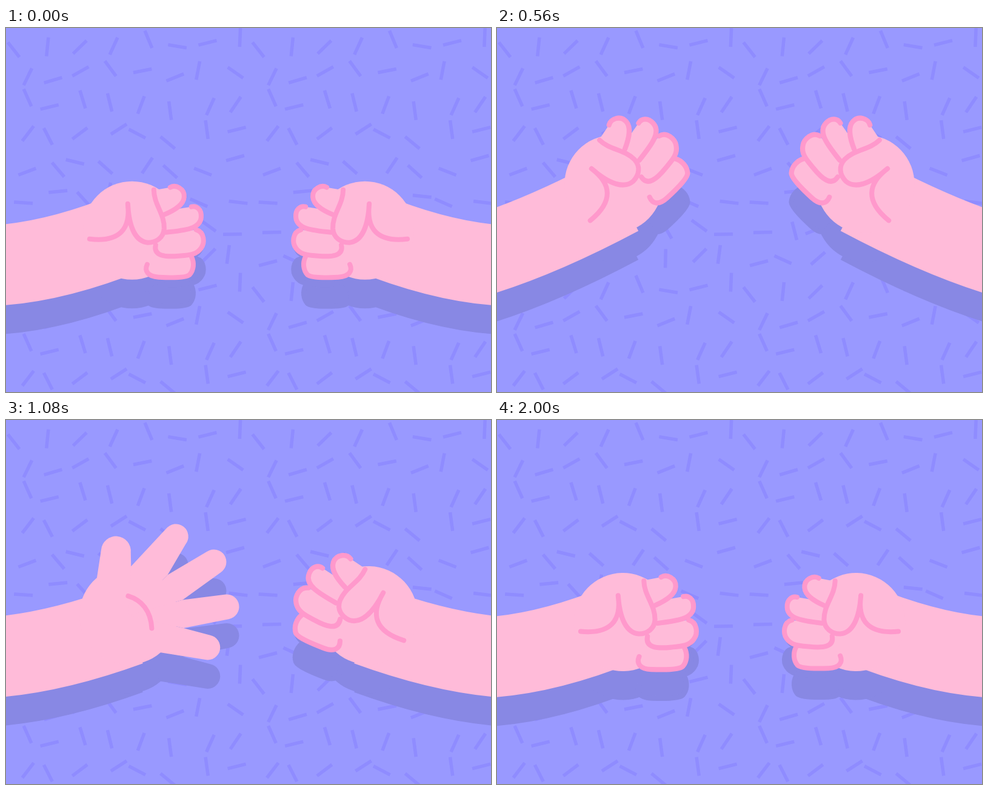
An HTML page with a canvas for the animation above (2040 ms loop, 800 by 600 pixels).

```html
<!DOCTYPE html>
<html>
<head>
<meta charset="utf-8">
<style>
html, body { margin: 0; width: 100%; height: 100%; overflow: hidden; background: #99f; }
canvas { display: block; }
</style>
</head>
<body>
<canvas width="800" height="600"></canvas>
<script>
const ctx = document.querySelector('canvas').getContext('2d');
const LOOP = 2040, STEP = 40, RAD = Math.PI / 180;
const SKIN = '#ffbbd9', LINE = '#ff99cc', SHADE = '#8888e4';

// Key poses: wrist x, wrist y, forearm angle, hand rotation, finger stretch
const REST = [160, 354, -22, 0, 0];
const UP = [160, 298, -28, -46, .03];
const DOWN = [165, 374, -16.5, -2, .04];
const HOLD = [161, 354, -20, -24, .03];

// Curled fingers: extra corner for the fill, then the outline
const CURLED = [
  ['248 268', '271 264C280 259 295 266 294 280C293 294 275 303 261 309'],
  ['280 300', '306 296C314 294 323 300 322 313C321 332 296 335 264 338'],
  ['264 338', '314 334C328 338 328 356 322 364C314 376 300 376 285 377C262 379 243 377 247 359'],
  ['250 370', '306 378C311 388 310 400 303 408C297 414 270 413 252 412C234 411 228 402 233 391']
].map(([corner, line]) => [new Path2D(`M${corner}L${line}`), new Path2D('M' + line)]);
const THUMB = new Path2D('M244 268C244 292 262 308 261 332C260 347 248 355 234 355' +
  'C214 353 203 330 201 291C206 332 188 355 138 349');
const CREASE = new Path2D('M0 -32C22 -25 37 -7 38 22');
const VALLEYS = [-129, -86, -45, -15, 14, 50];

const ramp = (t, from, to) => Math.min(1, Math.max(0, (t - from) / (to - from)));
const smooth = (t, from, to) => {
  const u = ramp(t, from, to);
  return u * u * (3 - 2 * u);
};
const mix = (a, b, k) => a.map((v, i) => v + (b[i] - v) * k);
const polar = (angle, r) => [r * Math.cos(angle * RAD), r * Math.sin(angle * RAD)];

// Lift slowly, throw with growing speed, bounce into the hold, return
function poseAt(t) {
  let pose = mix(REST, UP, smooth(t, 120, 560));
  pose = mix(pose, DOWN, ramp(t, 560, 870) ** 2.7);
  pose = mix(pose, HOLD, smooth(t, 860, 1080));
  return mix(pose, REST, smooth(t, 1740, LOOP));
}
const openAt = t => smooth(t, 760, 880) - smooth(t, 1740, LOOP);

// Repeating tile of dashes on a jittered grid
function scatter() {
  const tile = 403.5, n = 8, cell = tile / n, path = new Path2D();
  let seed = 7;
  const random = () => (seed = seed * 16807 % 2147483647) / 2147483647;
  for (let i = 0; i < n * n; i++) {
    const x0 = (i % n + .25 + random() / 2) * cell;
    const y0 = (Math.floor(i / n) + .25 + random() / 2) * cell;
    const [dx, dy] = polar(random() * 180, 15.5);
    for (let x = x0 - tile; x < 820; x += tile)
      for (let y = y0 - tile; y < 620; y += tile) {
        path.moveTo(x - dx, y - dy);
        path.lineTo(x + dx, y + dy);
      }
  }
  return path;
}
const dashes = scatter();

function background() {
  ctx.fillStyle = '#9999ff';
  ctx.fillRect(0, 0, 800, 600);
  ctx.strokeStyle = '#8f8cff';
  ctx.lineWidth = 5.5;
  ctx.lineCap = 'butt';
  ctx.stroke(dashes);
}

function fist(stretch) {
  ctx.save();
  ctx.scale(1 + stretch, 1 + stretch);
  ctx.translate(-208, -335);
  for (const [shape] of CURLED) ctx.fill(shape);
  for (const [, line] of CURLED) ctx.stroke(line);
  ctx.restore();
  ctx.translate(-208, -335);
  ctx.stroke(THUMB);
}

// One finger between two valleys of the palm
function finger(i, angle, length, r, reach) {
  const edge = k => polar(VALLEYS[k], reach * (k > 1 && k < 5 ? 93 : 81));
  const a = edge(i), b = edge(i + 1);
  const [x, y] = polar(angle, length * reach);
  const dir = Math.atan2(y - (a[1] + b[1]) / 2, x - (a[0] + b[0]) / 2);
  ctx.beginPath();
  ctx.moveTo(0, 0);
  ctx.lineTo(...a);
  ctx.arc(x, y, r, dir - Math.PI / 2, dir + Math.PI / 2);
  ctx.lineTo(...b);
  ctx.fill();
}

function spread(open) {
  const reach = .55 + .45 * open;
  ctx.rotate(23 * RAD);
  finger(0, -100, 108, 24.5, reach);
  for (let i = 0; i < 4; i++)
    finger(i + 1, -58 + 27 * i, 167 - 9 * (i - 1.3) ** 2, 20.5, reach);
  ctx.stroke(CREASE);
}

function limb([wx, wy, tilt, turn, stretch], open, skin, line) {
  const slope = Math.tan(tilt * RAD), ex = wx + 42, ey = wy + 42 * slope;
  const [hx, hy] = polar(-23 + .62 * turn, 52);

  ctx.lineCap = 'butt';
  ctx.lineWidth = 133;
  ctx.strokeStyle = ctx.fillStyle = skin;
  ctx.beginPath();
  ctx.moveTo(-40, 392 + (wy - 354) * .24);
  ctx.quadraticCurveTo(67, ey - (ex - 67) * slope, ex, ey);
  ctx.stroke();

  ctx.save();
  ctx.translate(wx + hx, wy + hy);
  ctx.rotate(turn * RAD);
  ctx.beginPath();
  ctx.arc(0, 0, 81, 0, 7);
  ctx.fill();
  ctx.strokeStyle = line;
  ctx.lineWidth = 8;
  ctx.lineCap = ctx.lineJoin = 'round';
  if (open < .45) fist(stretch + open / 2);
  else spread(open);
  ctx.restore();
}

function arm(pose, open) {
  ctx.save();
  ctx.translate(0, 47.5);
  limb(pose, open, SHADE, SHADE);
  ctx.restore();
  limb(pose, open, SKIN, LINE);
}

function draw() {
  const t = Math.floor(performance.now() % LOOP / STEP) * STEP;
  const pose = poseAt(t);
  background();
  arm(pose, openAt(t));
  ctx.save();
  ctx.translate(800, 0);
  ctx.scale(-1, 1);
  arm(pose, 0);
  ctx.restore();
  requestAnimationFrame(draw);
}
draw();
</script>
</body>
</html>
```
